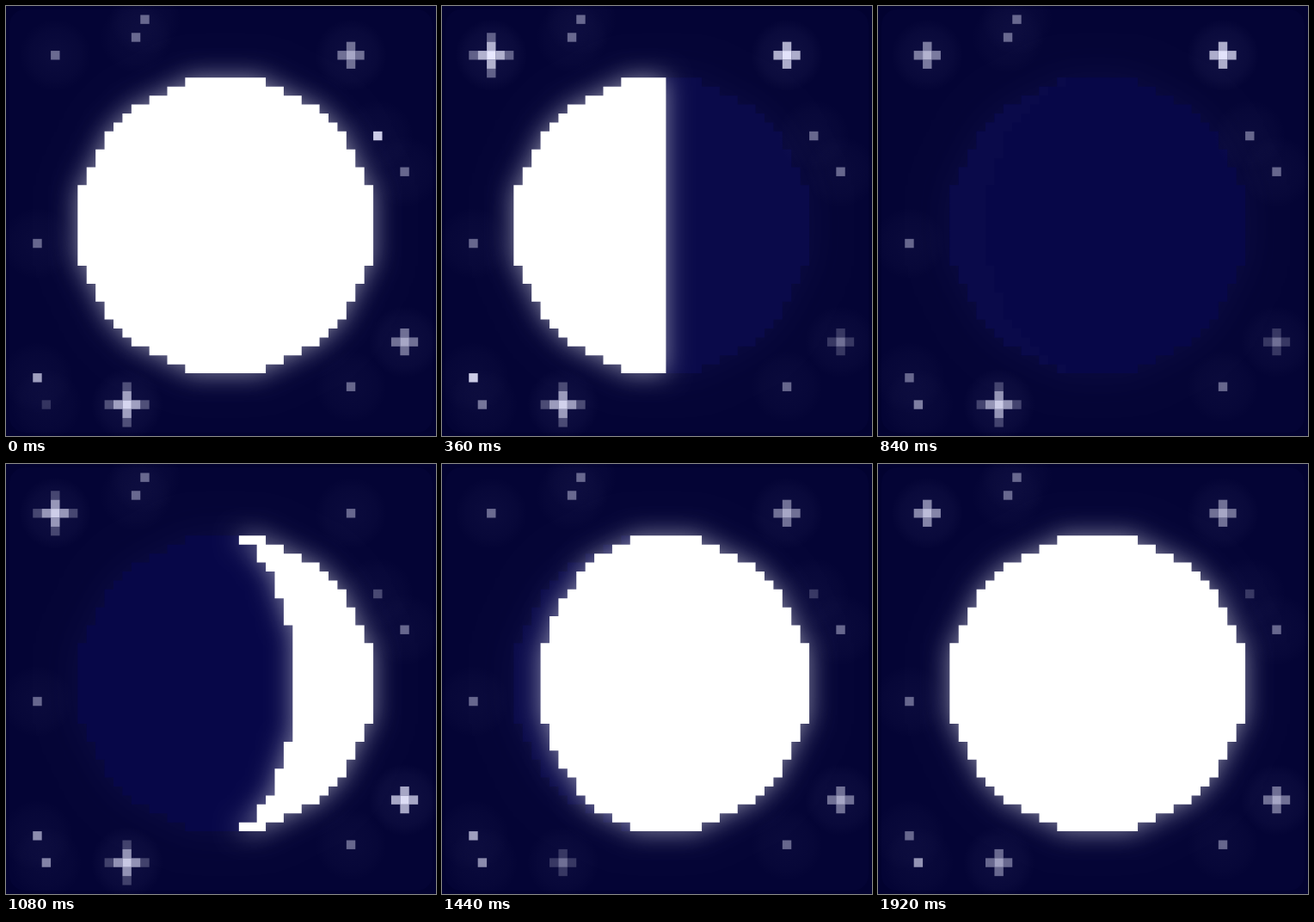
Recreate the animation shown at these times as an HTML page with a canvas. Size 500 px wide and 500 px high, loop 2040 ms.

```html
<!DOCTYPE html>
<html lang="en">
<head>
<meta charset="utf-8">
<title>Moon phases</title>
<style>
  html, body { margin: 0; width: 100%; height: 100%; overflow: hidden; background: #020230; }
  canvas { display: block; width: 500px; height: 500px; }
</style>
</head>
<body>
<canvas id="sky" width="500" height="500"></canvas>
<script>
const ctx = document.getElementById('sky').getContext('2d');
const STEP_MS = 120, STEPS = 17, CELL = 500 / 48;
const EDGE = '#020230', NIGHT = '#040435', SHADE = '#0a0a4a', DEEP = '#070748';
const CENTER = 24.5, REACH = 16, RADIUS_SQ = 273;
const cosDeg = degrees => Math.cos(degrees * Math.PI / 180);

// Brightness over time: a steady wave, or straight lines between [step, level] points
const wave = (mid, swing, peak) => step => mid + swing * Math.cos((step - peak) * Math.PI / 2);
const through = (...points) => step => {
  const i = points.findIndex(([at]) => at >= step);
  if (i < 0) return points[points.length - 1][1];
  if (i === 0) return points[0][1];
  const [a, from] = points[i - 1], [b, to] = points[i];
  return from + (to - from) * (step - a) / (b - a);
};
const steady = () => .42;

const stars = [
  { x: 5, y: 5, arms: 2, level: through([0, .43], [3, 1], [5, .7], [7, .75], [10, .95], [12, .43], [16, .8]) },
  { x: 13, y: 44, arms: 2, level: through([0, .92], [10, .85], [12, .45], [16, .67]) },
  { x: 38, y: 5, arms: 1, level: wave(.7, .28, 3) },
  { x: 44, y: 37, arms: 1, level: wave(.7, .25, 5) },
  { x: 41, y: 14, arms: 0, level: through([0, .88], [3, .42], [7, .42], [10, .2]) },
  { x: 3, y: 41, arms: 0, level: through([0, .67], [4, .95], [7, .42], [10, .67], [12, .67], [16, .42]) },
  { x: 4, y: 44, arms: 0, level: through([0, .18], [3, .48], [16, .62]) },
  ...[[15, 1], [14, 3], [44, 18], [3, 26], [38, 42]]
    .map(([x, y]) => ({ x, y, arms: 0, level: steady }))
];

function drawHalo(x, y, radius, strength) {
  const cx = (x + .5) * CELL, cy = (y + .5) * CELL;
  const halo = ctx.createRadialGradient(cx, cy, 0, cx, cy, radius);
  halo.addColorStop(0, `rgba(190,190,255,${strength})`);
  halo.addColorStop(.7, `rgba(190,190,255,${strength * .5})`);
  halo.addColorStop(1, 'rgba(190,190,255,0)');
  ctx.fillStyle = halo;
  ctx.fillRect(cx - radius, cy - radius, radius * 2, radius * 2);
}

function fillCell(x, y, alpha) {
  ctx.fillStyle = `rgba(232,232,255,${alpha})`;
  ctx.fillRect(x * CELL, y * CELL, CELL, CELL);
}

function drawStar({ x, y, arms, level }, step) {
  const glow = level(step);
  drawHalo(x, y, 42, arms ? .02 + .05 * glow : .03);
  fillCell(x, y, glow);
  for (let d = 1; d <= arms; d++) {
    const alpha = glow - .25 * d ** 1.3;
    if (alpha < .19) continue;
    for (const [dx, dy] of [[d, 0], [-d, 0], [0, d], [0, -d]])
      fillCell(x + dx, y + dy, alpha);
  }
}

// Fills, row by row, the part of the disc that span(halfWidth) returns
function fillDisc(color, span) {
  ctx.fillStyle = color;
  ctx.beginPath();
  for (let row = -REACH; row <= REACH; row++) {
    const [from, to] = span(Math.sqrt(RADIUS_SQ - row * row));
    const y = CENTER + row - .5;
    if (to > from) ctx.rect(from * CELL, y * CELL, (to - from) * CELL, CELL);
  }
  ctx.fill();
}

// Column on the cell grid where an ellipse squeezed by k meets the row
const column = (half, k) =>
  CENTER + (k < 0 ? -1 : 1) * (Math.floor(Math.abs(k) * half) + .5);
const whole = half => [column(half, -1), column(half, 1)];
const leftOf = angle => half => [column(half, -1), column(half, cosDeg(angle))];
const rightOf = angle => half => [column(half, cosDeg(angle)), column(half, 1)];

function litPart(step) {
  if (step === 0 || step > 12) return whole;
  if (step < 5) return leftOf(30 * step);
  if (step > 7) return rightOf(90 + 27.1 * (step - 10));
  return null;
}

function withGlow(color, blur, paint) {
  ctx.save();
  ctx.shadowColor = color;
  ctx.shadowBlur = blur;
  paint();
  ctx.restore();
}

function drawMoon(step) {
  const lit = litPart(step);
  const dark = step > 3 && step < 11 ? DEEP : SHADE;
  withGlow('rgba(60,60,150,.14)', 44, () => fillDisc(dark, whole));
  if (lit) withGlow('rgba(255,255,255,.52)', 29, () => fillDisc('#fff', lit));
  else fillDisc(SHADE, leftOf(139.5));
}

function drawSky() {
  ctx.fillStyle = EDGE;
  ctx.fillRect(0, 0, 500, 500);
  ctx.fillStyle = NIGHT;
  ctx.beginPath();
  ctx.roundRect(4, 4, 492, 492, 18);
  ctx.fill();
}

function draw() {
  const step = Math.floor(performance.now() / STEP_MS) % STEPS;
  drawSky();
  drawMoon(step);
  stars.forEach(star => drawStar(star, step));
  requestAnimationFrame(draw);
}
draw();
</script>
</body>
</html>
```
